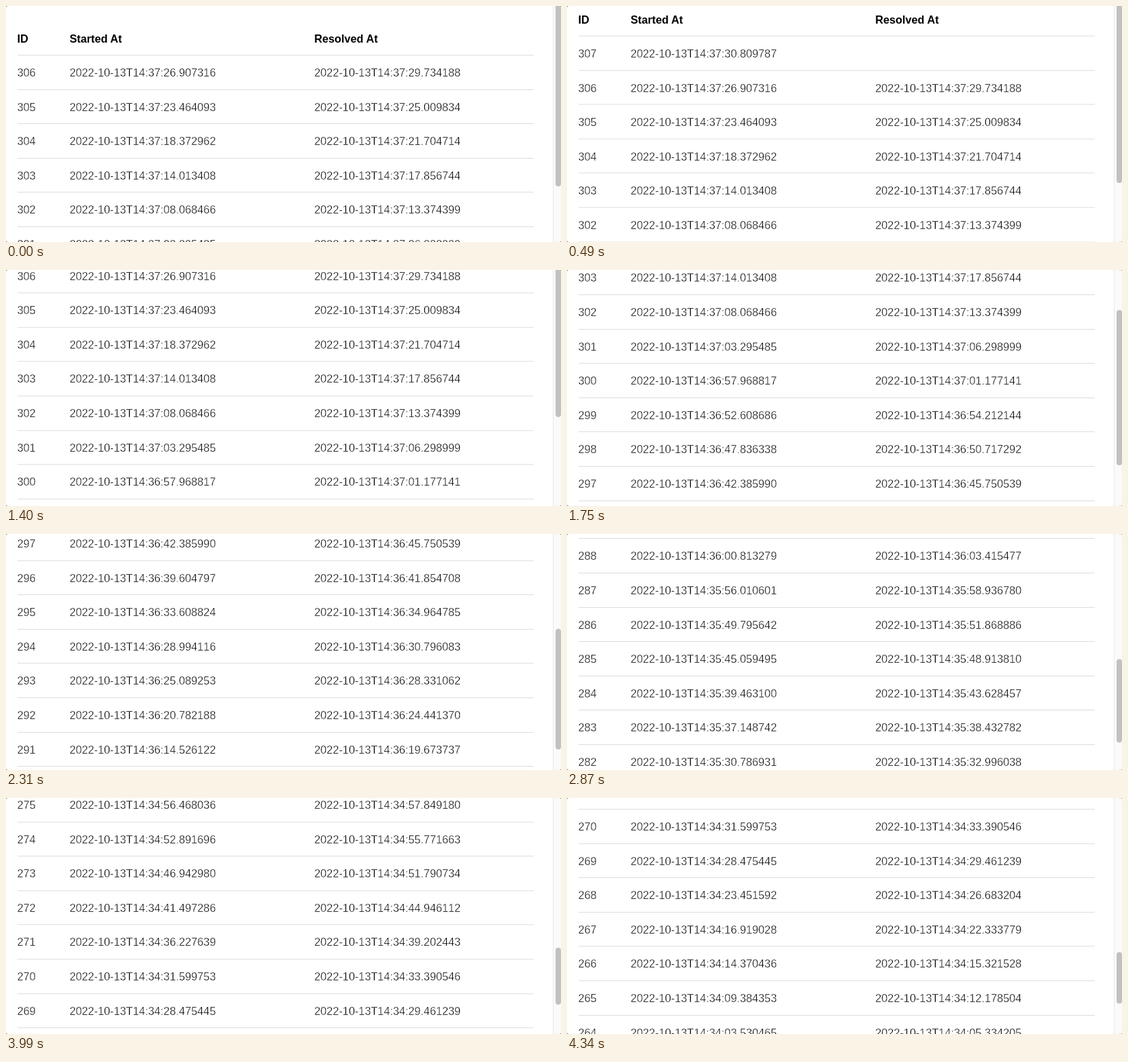
An HTML page that plays this animation: 816x348 px, repeating every 4620 ms.

```html
<!DOCTYPE html>
<html lang="en">
<head>
<meta charset="utf-8">
<title>Incident list</title>
<style>
  html, body { margin: 0; width: 100%; height: 100%; overflow: hidden; background: #777; }
  #stage {
    position: relative; width: 816px; height: 348px; overflow: hidden;
    background: #fff; border-radius: 3px;
    font: 16.25px "Liberation Sans", Arial, sans-serif; color: #000;
  }
  #list { position: absolute; left: 17px; top: 21.5px; width: 759px; }
  .row {
    position: relative; box-sizing: border-box; height: 50.6px;
    border-top: 1px solid #ddd; line-height: 50.6px; white-space: nowrap;
    font-kerning: none; -webkit-text-stroke: .4px #fff;
  }
  .head { border-color: transparent; font-weight: bold; font-kerning: auto; -webkit-text-stroke: 0; }
  .row span { position: absolute; left: -.5px; }
  .row span:nth-child(2) { left: 76.4px; }
  .row span:nth-child(3) { left: 436.3px; }
  #track {
    position: absolute; right: 0; top: 0; width: 11px; height: 100%;
    background: #fafafa; border-left: 1px solid #e8e8e8;
  }
  #thumb { position: absolute; left: 3px; top: 0; width: 8px; border-radius: 4px; background: #c1c1c1; }
</style>
</head>
<body>
<div id="stage">
  <div id="list"></div>
  <div id="track"><div id="thumb"></div></div>
</div>
<script>
const LOOP = 4620, STEP = 70;
const NEWEST_ID = 307, ROW_COUNT = 46, ROW_HEIGHT = 50.6;
const NEWEST_START = 37 * 60 + 30.809787, MEAN_GAP = 4.85;   // seconds past 14:00
const VIEW = 480, VIEW_TOP = -79;      // the scrolled area begins above the stage
const BASE_HEIGHT = 718, PAGE_HEIGHT = 288, SCROLL_PER_PAGE = 240;

// Each swipe scrolls in 70 ms steps to a new resting offset.
const swipes = [
  { start: 70, steps: 1, to: 14 },
  { start: 490, steps: 3, to: 40 },
  { start: 770, steps: 4, to: 74 },
  { start: 1400, steps: 6, to: 289 },
  { start: 2030, steps: 5, to: 590 },
  { start: 2660, steps: 4, to: 1027 },
  { start: 3220, steps: 6, to: 1433 },
  { start: 3850, steps: 4, to: 1725 },
  { start: 4200, steps: 3, to: 1928 }
];

const list = document.getElementById("list");
const thumb = document.getElementById("thumb");

const noise = seed => {
  const x = Math.sin(seed * 127.1) * 43758.5453;
  return x - Math.floor(x);
};
const easeOut = x => 1 - (1 - x) ** 2;

const startedAt = i => NEWEST_START - MEAN_GAP * (i - 0.6 * noise(i));
const resolvedAt = i =>
  startedAt(i) + (0.2 + 0.7 * noise(i + 0.5)) * (startedAt(i - 1) - startedAt(i));

function stamp(time) {
  const minutes = Math.floor(time / 60);
  const seconds = (time % 60).toFixed(6).padStart(9, "0");
  return `2022-10-13T14:${minutes}:${seconds}`;
}

function addRow(cells, className = "row") {
  const row = document.createElement("div");
  row.className = className;
  for (const text of cells) {
    row.appendChild(document.createElement("span")).textContent = text;
  }
  return list.appendChild(row);
}

function scrollAt(t) {
  let scroll = 0;
  for (const { start, steps, to } of swipes) {
    if (t < start) break;
    const step = Math.min(Math.floor((t - start) / STEP) + 1, steps);
    scroll += (to - scroll) * easeOut(step / steps);
  }
  return scroll;
}

addRow(["ID", "Started At", "Resolved At"], "row head");
const newestRow = addRow([NEWEST_ID, stamp(NEWEST_START)]);
for (let i = 1; i < ROW_COUNT; i++) {
  addRow([NEWEST_ID - i, stamp(startedAt(i)), stamp(resolvedAt(i))]);
}

function render() {
  const t = performance.now() % LOOP;
  const scroll = scrollAt(t);
  const arrived = t >= STEP;
  const pages = Math.round(scroll / SCROLL_PER_PAGE);
  const height = BASE_HEIGHT + PAGE_HEIGHT * pages - (arrived ? 0 : ROW_HEIGHT);

  newestRow.style.display = arrived ? "" : "none";
  list.style.transform = `translateY(${-scroll}px)`;
  thumb.style.height = VIEW * VIEW / height + "px";
  thumb.style.transform = `translateY(${VIEW_TOP + scroll * VIEW / height}px)`;
  requestAnimationFrame(render);
}
render();
</script>
</body>
</html>
```
